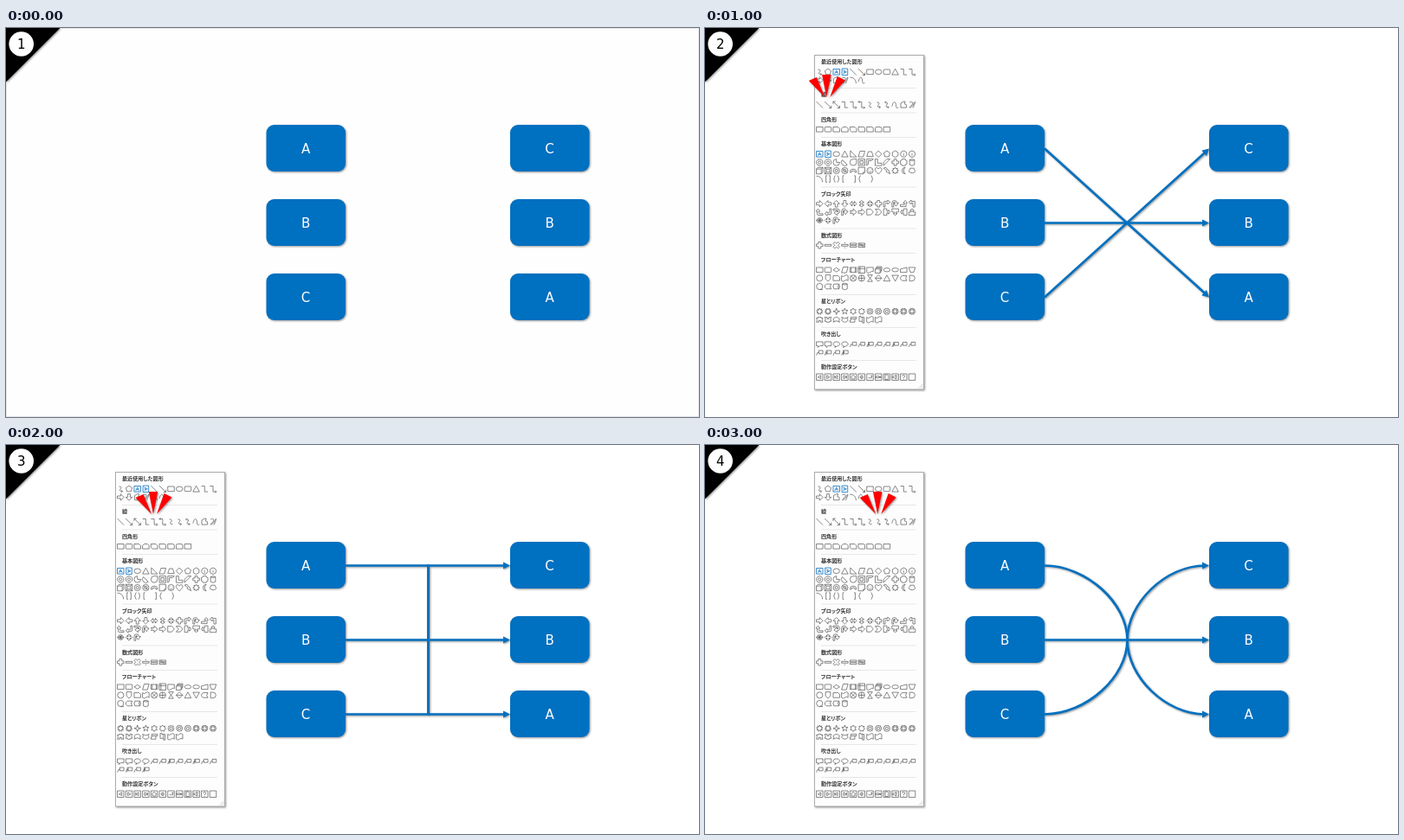
These frames come from a looping animation (800 by 450 pixels, 4 s). An HTML page:

```html
<!DOCTYPE html>
<html lang="ja">
<head>
<meta charset="utf-8">
<title>Connectors</title>
<style>
html, body { margin: 0; width: 100%; height: 100%; overflow: hidden; background: #fff; }
svg { display: block; width: 800px; height: 450px; }
.step { animation: step 4s step-end infinite; animation-delay: calc((var(--n) - 4) * 1s); }
.late { animation: late 4s step-end infinite; }
@keyframes step { 0% { opacity: 1; } 25%, 100% { opacity: 0; } }
@keyframes late { 0% { opacity: 0; } 25%, 100% { opacity: 1; } }
.label, .num { font: 15px "DejaVu Sans", "Noto Sans", sans-serif; text-anchor: middle; }
.label { fill: #fff; }
.box { fill: #0070c0; }
.lines { fill: none; stroke: #0070c0; stroke-width: 2.7; }
.shade { filter: drop-shadow(1.5px 1.5px 1px rgba(0, 0, 0, .42)); }
.head { font: bold 6.1px "Noto Sans CJK JP", "Noto Sans CJK", sans-serif; font-feature-settings: "palt"; fill: #333; }
.icon { fill: none; stroke: #4c4c4c; stroke-width: .7; }
.blue { stroke: #1878c4; stroke-width: .9; }
.rule { stroke: #e3e3e3; stroke-width: .8; }
</style>
</head>
<body>
<svg viewBox="0 0 800 450">
  <defs>
    <marker id="tip" orient="auto" markerUnits="userSpaceOnUse" markerWidth="10" markerHeight="10" overflow="visible">
      <path d="M-3-4.1 5 0-3 4.1Z" fill="#0070c0" stroke="none"/>
    </marker>
    <g id="wedges" class="shade" fill="#f00">
      <path d="M-20.5 61-11.5 57-2 80Z"/>
      <path d="M-5.2 54H5.2L0 80Z"/>
      <path d="M12.5 56 21.5 60.5 4 80Z"/>
    </g>
  </defs>

  <g class="step" style="--n:0">
    <rect x=".5" y=".5" width="799" height="449" fill="#fefefe" stroke="#e4e4e4"/>
  </g>

  <path class="shade" d="M0 0H62.5L0 62.5Z"/>
  <circle cx="17.7" cy="18.5" r="14.3" fill="#fff"/>
  <g id="nums"></g>

  <g class="late">
    <rect class="shade" x="126.5" y="31.5" width="126" height="386.5" fill="#fdfdfd" stroke="#a6a6a6" stroke-width=".9"/>
    <path d="M247 416.5 251.500 412M249.500 416.500 251.500 414.500" stroke="#bbb" stroke-width=".7"/>
    <g id="panel"></g>
  </g>

  <g id="boxes"></g>

  <g class="step" style="--n:1">
    <g class="lines shade">
      <path marker-end="url(#tip)" d="M392 139.500 578.300 308.100"/>
      <path marker-end="url(#tip)" d="M392 225.500H577"/>
      <path marker-end="url(#tip)" d="M392 311.500 578.300 142.900"/>
    </g>
    <use href="#wedges" x="140.300"/>
  </g>
  <g class="step" style="--n:2">
    <g class="lines shade">
      <path marker-end="url(#tip)" d="M392 139.500H487.500V311.500H577"/>
      <path marker-end="url(#tip)" d="M392 225.500H577"/>
      <path marker-end="url(#tip)" d="M392 311.500H487.500V139.500H577"/>
    </g>
    <use href="#wedges" x="170"/>
  </g>
  <g class="step" style="--n:3">
    <g class="lines shade">
      <path marker-end="url(#tip)" d="M392 139.500C439.700 139.500 487.500 182.500 487.500 225.500S532 311.500 577 311.500"/>
      <path marker-end="url(#tip)" d="M392 225.500H577"/>
      <path marker-end="url(#tip)" d="M392 311.500C439.700 311.500 487.500 268.500 487.500 225.500S532 139.500 577 139.500"/>
    </g>
    <use href="#wedges" x="199.200"/>
  </g>
</svg>

<script>
const put = (id, html) => { document.getElementById(id).innerHTML = html; };

const oval = (x, y = x) => `M${-x} 0A${x} ${y} 0 1 1 ${x} 0A${x} ${y} 0 1 1 ${-x} 0Z`;
const rect = (x, y = x) => `M${-x} ${-y}H${x}V${y}H${-x}Z`;
const ring = (n, radius) => 'M' + Array.from({ length: n }, (_, i) => {
  const a = i / n * 2 * Math.PI, r = radius(i);
  return (r * Math.sin(a)).toFixed(2) + ' ' + (-r * Math.cos(a)).toFixed(2);
}).join('L') + 'Z';
const poly = n => ring(n, () => 4);
const star = (n, inner) => ring(2 * n, i => i % 2 ? inner : 4);

const shapes = {
  line: 'M-4-4 4 4', end: 'M1 4H4V1', start: 'M-4-1V-4H-1',
  elbow: 'M-4-3.5H0V3.5H4', eEnd: 'M2.500 2 4 3.500 2.500 5', eStart: 'M-2.500-5-4-3.500-2.500-2',
  ess: 'M-2-3C6-3-6 3 2 3', sEnd: 'M1 1.500 2.500 3 1 4.500', sStart: 'M-1-4.500-2.500-3-1-1.500',
  curve: 'M-4 2C-2-7 1-3 1 1S3 4 4 3', free: 'M-3.500 3.500V-2L0-4H2L1-1 3.500 0V3.500Z',
  scrib: 'M-3-3C3-5 1 0-2 2S-1 5 2-1 4-2 1 4', arc: 'M-4-3.500C1-3.500 3.500 0 3.500 4',
  rect: rect(4, 3), sq: rect(4), inner: rect(2), mini: rect(2.500, 1.500),
  round: 'M-3-3H3Q4-3 4-2V2Q4 3 3 3H-3Q-4 3-4 2V-2Q-4-3-3-3Z',
  snip: 'M-4-3H2L4-1V3H-4Z', snip2: 'M-4 3V-1L-2-3H2L4-1V3Z', snip3: 'M-4-3H2L4-1V3H-2L-4 1Z',
  cap: 'M-4 3V-1Q-4-3-2-3H2Q4-3 4-1V3Z', leaf: 'M-4-3H2Q4-3 4-1V3H-2Q-4 3-4 1Z', tab: 'M-4-3H2Q4-3 4-1V3H-4Z',
  oval: oval(4, 3), disc: oval(3.800), dot: oval(1.700), pill: oval(4, 2.300),
  tri: 'M0-3.800 4 3.500H-4Z', rtri: 'M-3.500-4V3.500H4Z', para: 'M-2-3.500H4L2 3.500H-4Z', trap: 'M-2-3H2L4 3H-4Z',
  dia: poly(4), flat: 'M-4 0 0-2.500 4 0 0 2.500Z', pent: poly(5), hex: poly(6), hept: poly(7), oct: poly(8), deca: poly(10), dodec: poly(12),
  pie: 'M0-4V0H4A4 4 0 1 1 0-4Z', chord: 'M-3-3 3 3A4 4 0 1 1-3-3Z', drop: 'M0-4H4V0A4 4 0 1 1 0-4Z',
  half: 'M-4-4H4L2-2H-2V2L-4 4Z', ell: 'M-4-4H-1V1H4V4H-4Z', stripe: 'M-4 4V0L0-4H4Z',
  plus: 'M-1.500-4H1.500V-1.500H4V1.500H1.500V4H-1.500V1.500H-4V-1.500H-1.500Z',
  plaque: 'M-2-4H2Q2-2 4-2V2Q2 2 2 4H-2Q-2 2-4 2V-2Q-2-2-2-4Z',
  can: 'M-3-3V3Q0 5 3 3V-3Q0-5-3-3Q0-1 3-3', cube: 'M-4-2H2V4H-4ZL-2-4H4L2-2M4-4V2L2 4',
  bevel: 'M-4-4-2-2M4-4 2-2M4 4 2 2M-4 4-2 2', slash: 'M-2.700-2.700 2.700 2.700',
  bow: 'M-4 2A4 4 0 0 1 4 2H2A2 2 0 0 0-2 2Z', fold: 'M-4-4H4V2L2 4H-4ZM4 2H2V4',
  face: 'M-2 1Q0 3.500 2 1M-1.500-1.500V-.5M1.500-1.500V-.5', heart: 'M0 4C-8-2-2-6 0-2C2-6 8-2 0 4Z',
  bolt: 'M-4-3-1-4 1-1 2-1 4 4-1 1 0 0Z', sun: star(8, 2.500), moon: 'M2-4A4 4 0 1 0 2 4Q-2 0 2-4Z',
  cloud: 'M-3 2Q-5 0-3-1Q-3-4 0-3Q3-4 3-1Q5 1 3 2Q1 4-3 2Z',
  brL: 'M-1-4H-2.500V4H-1', brR: 'M1-4H2.500V4H1', cuL: 'M-1-4Q-2.500-4-2.500-2T-3.500 0Q-2.500 0-2.500 2T-1 4', cuR: 'M1-4Q2.500-4 2.500-2T3.500 0Q2.500 0 2.500 2T1 4',
  go: 'M-4-1.500H0V-4L4 0 0 4V1.500H-4Z', two: 'M-4 0-1.500-3V-1H1.500V-3L4 0 1.500 3V1H-1.500V3Z',
  quad: 'M0-4 2-2H1V-1H2V-2L4 0 2 2V1H1V2H2L0 4-2 2H-1V1H-2V2L-4 0-2-2V-1H-1V-2H-2Z',
  bent: 'M-4 4V-1Q-4-3-2-3H1V-4.500L4-2 1 .5V-1H-1Q-2-1-2 0V4Z', turn: 'M-4 4V-1A3 3 0 0 1 2-1H4L1 3-2-1H0A1 1 0 0 0-2-1V4Z',
  up: 'M-4 1H1V-1H-.5L2-4 4.500-1H3V3.500H-4Z', notch: 'M-4-1.500H0V-4L4 0 0 4V1.500H-4L-2.500 0Z',
  home: 'M-4-3.500H1L4 0 1 3.500H-4Z', chev: 'M-4-3.500H1L4 0 1 3.500H-4L-1 0Z', call: 'M-4-4H0V-1H2V-2.500L4 0 2 2.500V1H0V4H-4Z',
  bar: 'M-4-1H4V1H-4Z', bars: 'M-4-2.500H4V-.5H-4ZM-4 .5H4V2.500H-4Z', ex: 'M-4-2-2-4 0-2 2-4 4-2 2 0 4 2 2 4 0 2-2 4-4 2-2 0Z',
  dots: 'M-.7-3H.7M-.7 3H.7', sides: 'M-2.500-3V3M2.500-3V3', grid: 'M-4-1.500H4M-2-4V4', doc: 'M-4-3H4V2Q2 1 0 3T-4 3Z',
  docs: 'M-4-1H2V4H-4ZM-3-1V-2.500H3V3H2M-2-2.500V-4H4V1H3', slope: 'M-4-1 4-3V3H-4Z', man: 'M-4-3H4L2 3H-2Z',
  off: 'M-3-4H3V1L0 4-3 1Z', tape: 'M-4-3Q-2-1 0-3T4-3V3Q2 1 0 3T-4 3Z', cross: 'M-3.800 0H3.800M0-3.800V3.800', diag: 'M-2.700-2.700 2.700 2.700M2.700-2.700-2.700 2.700',
  glass: 'M-3-4H3L-3 4H3Z', mid: 'M-4 0H4', stored: 'M-2-3H4Q1 0 4 3H-2Q-6 0-2-3Z', dee: 'M-3-3.500H0A3.500 3.500 0 0 1 0 3.500H-3Z', tail: 'M0 3.800H4',
  boom: star(9, 2.200), four: star(4, 1.300), five: star(5, 1.700), six: star(6, 2.400), seven: star(7, 2.700), eight: star(8, 3), ten: star(10, 3.100), many: star(14, 3.300),
  ribbon: 'M-4-2H-2V-3H2V-2H4L3 .5 4 3H1V1H-1V3H-4L-3 .5Z', sash: 'M-4-1Q0-5 4-1L3 1 4 3Q0 0-4 3L-3 1Z', scroll: 'M-3-3H4V-1H2V3H-4V1H-3ZM-3-1H2',
  talk: 'M-4-3H4V2H0L-2 4V2H-4Z', bub: 'M-2 4-1 2.300C-5 2-5-3 0-3S5 2 1 2.300Z', lead: 'M-1-2.500H4V1.500H-1ZM-1 0H-2.500L-4 3.500', rail: 'M-2-3V3',
  play: 'M-1.500-2 2 0-1.500 2Z', stop: 'M2-2V2', house: 'M-3 0 0-2.500 3 0M-2 0V2.500H2V0', info: 'M0-.5V2M0-2V-1.500', hook: 'M-2 1H2V-2M1-1 2-2 3-1',
  film: 'M-3-1H1V1H-3ZM1 0 3-1V1Z', page: 'M-2-3H1L2-2V3H-2Z', horn: 'M-3-1H-1L1-2.500V2.500L-1 1H-3ZM2-1 3-2M2 1 3 2', ask: 'M-1.500-1Q-1.500-2.500 0-2.500T1.500-1Q1.500 0 0 .5V1.500M0 2.300V3',
  letter: 'M-2 2 0-2 2 2M-1 .7H1', sq2: rect(4, 3.500)
};

// "a+b@90" overlays shapes and turns them; a leading * makes them blue
const sections = [
  [39, '最近使用した図形', 'ess+sEnd pent *sq2+letter *sq2+letter@90 line line+end rect oval round tri elbow elbow+eEnd', 'go go@90 free scrib arc curve'],
  [77, '線', 'line line+end line+start+end elbow elbow+eEnd elbow+eStart+eEnd ess ess+sEnd ess+sStart+sEnd curve free scrib'],
  [105.5, '四角形', 'rect round snip snip2 snip3 leaf tab cap rect'],
  [134, '基本図形', '*sq2+letter *sq2+letter@90 oval tri rtri para trap dia pent hex hept+info oct+info',
    'deca+dot dodec+dot pie chord drop sq+inner half ell stripe plus plaque can',
    'cube sq+inner+bevel disc+dot disc+dot+slash bow fold disc+face heart bolt sun moon cloud', 'arc brL+brR cuL+cuR brL brR cuL cuR'],
  [191.5, 'ブロック矢印', 'go go@180 go@270 go@90 two two@90 quad plus bent turn up up@270',
    'bent@270 bent@180 turn@90 turn notch go home chev call call@90 call@180 call@270', 'two+cross quad turn'],
  [239.5, '数式図形', 'plus bar ex bar+dots bars bars+slash'],
  [268, 'フローチャート', 'rect round flat para rect+sides sq+grid doc docs pill pill slope man',
    'disc off snip tape disc+diag disc+cross glass dia+mid tri tri@180 stored dee', 'disc+tail stored can@90 can'],
  [316, '星とリボン', 'boom boom@20 four five six seven eight+dot ten+dot many+dot many+inner many+inner many+inner', 'ribbon ribbon@180 sash sash@180 scroll scroll@90 tape tape'],
  [354, '吹き出し', 'talk talk bub bub lead lead lead+rail lead lead lead+rail lead lead', 'lead lead+rail lead lead+rail'],
  [392, '動作設定ボタン', 'sq+play@180 sq+play sq+play+stop@180 sq+play+stop sq+house sq+dot+info sq+hook sq+film sq+page sq+horn sq+ask sq']
];

function icon(spec, x, y) {
  const [names, turn = 0] = spec.replace('*', '').split('@');
  const d = names.split('+').map(n => shapes[n]).join('');
  return `<path class="icon${spec[0] === '*' ? ' blue' : ''}" d="${d}" transform="translate(${x} ${y}) rotate(${turn}) scale(.94)"/>`;
}

put('panel', sections.map(([y, title, ...rows], i) =>
  (i ? `<path class="rule" d="M134 ${y - 7.5}H244"/>` : '') +
  `<text class="head" x="134" y="${y + 2.3}">${title}</text>` +
  rows.map((row, r) => row.split(' ').map((s, c) => icon(s, 132.3 + c * 9.7, y + 11.8 + r * 9.6)).join('')).join('')
).join(''));

const column = (x, letters) => [...letters].map((ch, i) => {
  const y = 112 + i * 86;
  return `<rect class="box shade" x="${x}" y="${y}" width="91.5" height="54" rx="9"/>` +
    `<text class="label" x="${x + 45.6}" y="${y + 33}">${ch}</text>`;
}).join('');
put('boxes', column(300.5, 'ABC') + column(582, 'CBA'));

put('nums', [0, 1, 2, 3].map(n =>
  `<text class="num step" style="--n:${n}" x="17.800" y="24">${n + 1}</text>`).join(''));
</script>
</body>
</html>
```
